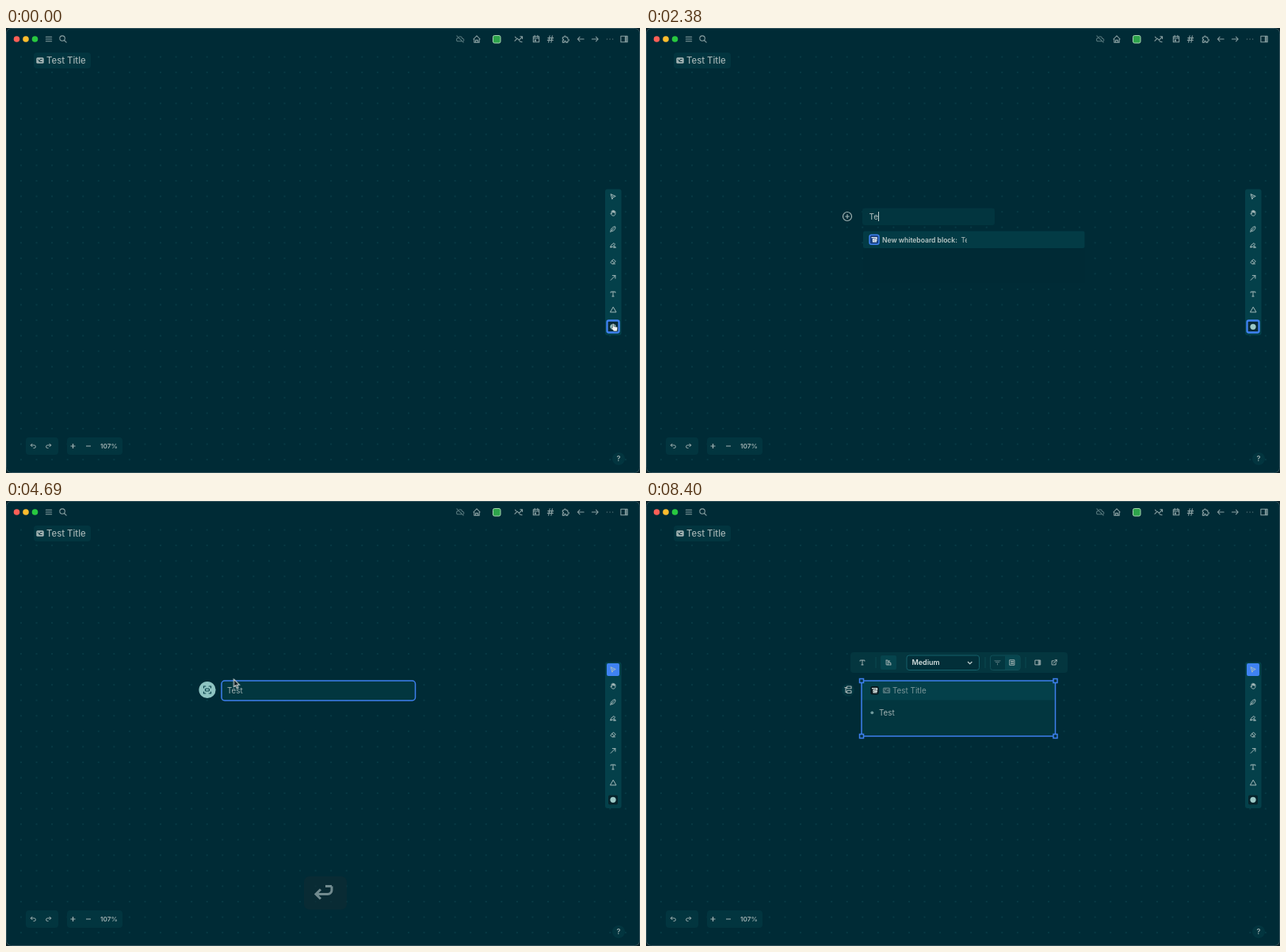
Animation, 800 px wide and 562 px high, one loop 8.47 s. Source, as an HTML page:

```html
<!DOCTYPE html>
<html lang="en">
<head>
<meta charset="utf-8">
<title>Whiteboard block</title>
<style>
html, body { margin: 0; width: 100%; height: 100%; overflow: hidden; background: #0b222a; }
body { position: relative; font-family: Inter, "Open Sans", sans-serif; color: #a3b3b3; }
svg { position: absolute; left: 0; top: 0; }
text { font-family: inherit; fill: currentColor; }

/* icons: 24-unit paths centred on their anchor */
.k, .t { fill: none; stroke: currentColor; stroke-width: 2.3; stroke-linecap: round; stroke-linejoin: round; }
.k { transform: scale(.46) translate(-12px, -12px); }
.t { transform: scale(.36) translate(-12px, -12px); stroke-width: 2.7; }
.dim { color: #55777c; }
.line { fill: none; stroke: currentColor; stroke-width: 1.2; }
.pill { fill: #02353f; }
.blue { stroke: #3e80ee; stroke-width: 1.5; }

.field, .row { position: absolute; display: flex; align-items: center; height: 22px; white-space: pre; }
.field { left: 281.5px; top: 227px; font-size: 9.8px; font-weight: 500; }
.row { left: 298px; font-size: 8.55px; font-weight: 500; }
.row b { font-weight: 600; color: #b9c6c5; }
.row i { font-style: normal; }
.row.sub { padding-left: 11px; color: #55777c; font-weight: 400; }
mark { margin-left: -1px; padding: 1px; border-radius: 1px; background: #f6eb9f; color: #68724f; }
.bar { width: 1px; height: 12px; background: #c3d0cf; }

/* timeline */
.a { animation: 8.47s step-end infinite; }
.menu { animation-name: menu; }
.hint { animation-name: hint; }
.typed { animation-name: typed; overflow: hidden; }
.after { animation-name: after; }
.found { animation-name: found; }
.caret { animation-name: caret; }
.edit { animation-name: edit; }
.caret2 { animation-name: caret2; }
.portal { animation-name: portal; }
.guide { animation-name: guide; }
.adding { animation-name: adding; }
.picking { animation-name: picking; }
.hand { animation-name: hand; }
.arrow { animation-name: arrow; }
.ring { animation-name: ring; animation-timing-function: ease-out; }
.ring2 { animation-name: ring2; animation-timing-function: ease-out; }
.key { animation-name: key; animation-timing-function: linear; }
.move { animation-name: move; animation-timing-function: ease-in-out; }

@keyframes menu { 0% { opacity: 0 } 11.57% { opacity: 1 } 49.59% { opacity: 0 } }
@keyframes hint { 0% { opacity: 1 } 23.97% { opacity: 0 } }
@keyframes after { 0% { opacity: 0 } 23.97% { opacity: 1 } }
@keyframes typed {
  0% { max-width: 0 } 23.97% { max-width: .6em } 26.45% { max-width: 1.13em }
  28.93% { max-width: 1.68em } 30.58% { max-width: 4em }
}
@keyframes found { 0% { opacity: 0 } 30.58% { opacity: 1 } 49.59% { opacity: 0 } }
@keyframes caret { 0% { opacity: 1 } 17.4% { opacity: 0 } 23.97% { opacity: 1 } 38.8% { opacity: 0 } 44.6% { opacity: 1 } }
@keyframes edit { 0% { opacity: 0 } 49.59% { opacity: 1 } 68.6% { opacity: 0 } }
@keyframes caret2 { 0% { opacity: 1 } 53.7% { opacity: 0 } 59.5% { opacity: 1 } 65.3% { opacity: 0 } }
@keyframes portal { 0% { opacity: 0 } 68.6% { opacity: 1 } }
@keyframes guide { 0% { opacity: 1 } 85% { opacity: 0 } }
@keyframes adding { 0% { opacity: 1 } 49.59% { opacity: 0 } }
@keyframes picking { 0% { opacity: 0 } 49.59% { opacity: 1 } }
@keyframes hand { 0% { opacity: 1 } 3.3% { opacity: 0 } }
@keyframes arrow { 0% { opacity: 0 } 3.3% { opacity: 1 } 21.5% { opacity: 0 } 52.07% { opacity: 1 } 88.5% { opacity: 0 } }
@keyframes ring {
  0%, 11.56% { opacity: 0; r: 6px } 11.57% { opacity: 1; r: 7px }
  13.3% { opacity: .75; r: 9.5px } 15.3%, 100% { opacity: 0; r: 11px }
}
@keyframes ring2 {
  0%, 68.5% { opacity: 0; r: 6px } 68.6% { opacity: 1; r: 7px }
  70.3% { opacity: .75; r: 9.5px } 72.3%, 100% { opacity: 0; r: 11px }
}
@keyframes key { 0%, 49.58% { opacity: 0 } 49.59%, 53.5% { opacity: 1 } 58.5%, 100% { opacity: 0 } }
@keyframes move {
  0%, 2.48% { transform: translate(766px, 374px) }
  10.74%, 52.07% { transform: translate(272px, 226px) }
  55.37%, 57.85% { transform: translate(287.5px, 225px) }
  67.3%, 100% { transform: translate(165.5px, 267px) }
}
</style>
</head>
<body>
<svg width="800" height="562" viewBox="0 0 800 562">
  <defs>
    <pattern id="dots" x="9.2" y="7.2" width="19.56" height="19.56" patternUnits="userSpaceOnUse">
      <circle cx="9.78" cy="9.78" r=".75" fill="#11505a"/>
    </pattern>
    <g id="menu"><path class="k" d="M4 6h16M4 12h16M4 18h16"/></g>
    <g id="search"><path class="k" d="M17 10a7 7 0 1 1-14 0a7 7 0 1 1 14 0M21 21l-6-6"/></g>
    <g id="cloud"><path class="k" d="M9.6 5.6a6 6 0 0 1 8.4 5.4h1a3.5 3.5 0 0 1 2.2 6.2M18 18H6.7a4.4 4.4 0 0 1 .2-9M3 3l18 18"/></g>
    <g id="home"><path class="k" d="M5 12H3l9-9 9 9h-2M5 12v9h14v-9M9 21v-6h6v6"/></g>
    <g id="trend"><path class="k" d="M1 17l7-7 5 5 9-10M16 5h6v6M2 6l3 3M14 18l7 2"/></g>
    <g id="calendar"><path class="k" d="M4 5h16v15H4zM4 10h16M8 2v5M16 2v5M8 14h3v3H8z"/></g>
    <g id="hash"><path class="k" d="M5 9h15M4 15h15M10 3L7 21M17 3l-3 18"/></g>
    <g id="puzzle"><path class="k" d="M4 7h4V6a2 2 0 0 1 5 0v1h5v5h1a2 2 0 0 1 0 5h-1v4h-5v-2a2 2 0 0 0-4 0v2H4v-5h1a2 2 0 0 0 0-4H4z"/></g>
    <g id="back"><path class="k" d="M4 12h17M10 6l-6 6 6 6"/></g>
    <g id="next"><path class="k" d="M3 12h17M14 6l6 6-6 6"/></g>
    <g id="more"><path class="k" stroke-width="4" d="M4 12h.1M12 12h.1M20 12h.1"/></g>
    <g id="side"><path class="k" d="M3 4h18v16H3zM15 4v16M18 5v14"/></g>

    <g id="select"><path class="t" d="M4 4l5 17 3-7 8-3zM9 9l3 3"/></g>
    <g id="palm"><path class="t" d="M7 14V6a1.7 1.7 0 0 1 3 0v5V4a1.7 1.7 0 0 1 3.300 0v7V5a1.700 1.700 0 0 1 3.300 0v7V8a1.700 1.700 0 0 1 3.400 0v7c0 4-3 7-7 7s-6-2-9-7c-1-2 1-3 3-1z"/></g>
    <g id="pencil"><path class="t" d="M3 21l2-8C7 8 13 3 19 3c3 4 0 11-5 14l-8 3zM8 16l6-7"/></g>
    <g id="marker"><path class="t" d="M3 18l3-7 9-7 4 4-8 8zM3 18h6M14 19l3-5 4 5z"/></g>
    <g id="eraser"><path class="t" d="M19 20H8l-5-5L13 4l8 7-9 9M8 9l8 7"/></g>
    <g id="ne"><path class="t" d="M4 20L20 4M10 4h10v10"/></g>
    <g id="type"><path class="t" d="M4 7V4h16v3M12 4v16M9 20h6"/></g>
    <g id="tri"><path class="t" d="M12 3L2 20h20z"/></g>
    <g id="undo"><path class="t" d="M8 4L3 9l5 5M3 9h12a5 5 0 0 1 0 10h-2"/></g>
    <g id="redo"><path class="t" d="M16 4l5 5-5 5M21 9H9a5 5 0 0 0 0 10h2"/></g>
    <g id="scale"><path class="t" d="M4 4v16h16M4 4h6v16M10 11l5-6v8M15 13h5v7"/></g>
    <g id="pane"><path class="t" d="M3 4h18v16H3zM14 4v16M18 5v14"/></g>
    <g id="open"><path class="t" d="M12 6H4v14h14v-8M10 14L21 3M15 3h6v6"/></g>
    <g id="page"><path class="t" d="M4 3h16v18H4zM8 8h8M8 12h8M8 16h8"/></g>
    <g id="fold"><path class="t" d="M2 6h20M6 11h12M12 15v5"/></g>

    <g id="board">
      <rect x="-4.700" y="-3.800" width="9.400" height="7.600" rx="1.600" fill="currentColor"/>
      <path d="M-2.800-1.500l2 3 1-3h2.500M-.5 1.500h3" fill="none" stroke="#06313b" stroke-width=".9"/>
    </g>
    <g id="chip"><rect x="-5.200" y="-5.200" width="10.400" height="10.400" rx="2.200" fill="#07191f"/></g>
    <g id="lines"><path class="line" d="M-3.500-2.700H3V-.6H-1.500V2.600H3M-.5 1H3.500"/></g>
    <g id="block"><use href="#chip"/><use href="#lines" color="#dfe8e6"/></g>
    <g id="bfind"><use href="#chip"/><g class="line" color="#dfe8e6"><path d="M-3.500-2.700H3M-1.500-2.500V.5H0M2.300 2.300l1.500 1.500"/><circle cx="1.300" cy="1" r="1.700"/></g></g>
    <g id="pfind"><use href="#chip"/><g class="line" color="#dfe8e6"><path d="M-.5 3.500H-3v-7h6V-.5M2.300 2.700l1.500 1.300"/><circle cx="1.300" cy="1.400" r="1.600"/></g></g>
    <g id="bchip"><use href="#chip"/><use href="#board" color="#dfe8e6"/></g>
    <g id="pchip"><use href="#chip"/><path d="M-2.700 3.500v-6.500h5.400v6.500M-2.700-2h5.400" fill="none" stroke="#dfe8e6" stroke-width="1.500"/></g>
    <g id="active"><rect x="-6" y="-6" width="12" height="12" rx="2.500" fill="#173f80" class="blue" stroke-width="1.300"/><use href="#lines" color="#f0f4f4"/></g>
  </defs>

  <rect x=".5" y=".5" width="799" height="561" rx="6" fill="#002b36" stroke="#31515a"/>
  <rect x="1" y="28" width="798" height="531" fill="url(#dots)"/>

  <g>
    <circle cx="13.500" cy="14" r="3.800" fill="#ff5f57"/>
    <circle cx="25" cy="14" r="3.800" fill="#febc2e"/>
    <circle cx="36.500" cy="14" r="3.800" fill="#28c840"/>
  </g>
  <g color="#8ca2a4">
    <use href="#menu" x="54" y="14"/>
    <use href="#search" x="72" y="14"/>
    <use href="#cloud" x="573" y="14" class="dim"/>
    <use href="#home" x="594" y="14"/>
    <rect x="614.500" y="9.500" width="9.500" height="9.500" rx="2" fill="#2ea44b" stroke="#a5d3b0"/>
    <use href="#trend" x="647" y="14"/>
    <use href="#calendar" x="669" y="14"/>
    <use href="#hash" x="687" y="14"/>
    <use href="#puzzle" x="706" y="14"/>
    <use href="#back" x="725" y="14"/>
    <use href="#next" x="743.500" y="14"/>
    <use href="#more" x="762" y="14"/>
    <use href="#side" x="780" y="14"/>
  </g>

  <rect class="pill" x="35" y="31" width="72" height="20" rx="4"/>
  <use href="#board" x="43" y="41"/>
  <text x="51" y="45" font-size="11.300" font-weight="500">Test Title</text>

  <rect class="pill" x="25" y="517" width="41" height="22" rx="4"/>
  <rect class="pill" x="77" y="517" width="70" height="22" rx="4"/>
  <use href="#undo" x="34.500" y="528"/>
  <use href="#redo" x="53.500" y="528"/>
  <path class="line" d="M81.500 528h6M84.500 525v6M101 528h6"/>
  <text x="119" y="531" font-size="8.200" font-weight="600">107%</text>
  <circle class="pill" cx="773" cy="544" r="8"/>
  <text x="773" y="547.300" font-size="9" font-weight="600" text-anchor="middle">?</text>

  <rect x="756" y="203.500" width="20.500" height="184.500" rx="3" fill="#04404a"/>
  <g class="a picking"><rect x="758" y="205" width="16" height="16" rx="2" fill="#3f82f2"/></g>
  <g color="#a9bcbc">
    <use href="#select" x="766" y="213"/>
    <use href="#palm" x="766" y="233.500"/>
    <use href="#pencil" x="766" y="254"/>
    <use href="#marker" x="766" y="274.500"/>
    <use href="#eraser" x="766" y="295"/>
    <use href="#ne" x="766" y="315.500"/>
    <use href="#type" x="766" y="336"/>
    <use href="#tri" x="766" y="356"/>
  </g>
  <rect x="760" y="371.500" width="12" height="12" rx="2" fill="#06232b"/>
  <g class="a adding"><rect x="758.500" y="369.500" width="15" height="15" rx="2" fill="#082a36" stroke="#3f82f2" stroke-width="2.300"/></g>
  <circle cx="766" cy="377.300" r="3.600" fill="#9cc8c6"/>
</svg>

<div class="a menu">
  <svg width="800" height="562">
    <circle class="line" cx="254" cy="238" r="5.500"/>
    <path class="line" d="M251.300 238h5.400M254 235.300v5.400"/>
    <rect class="pill" x="273" y="227.500" width="167" height="21.500" rx="3"/>
    <rect x="274" y="257" width="280" height="65" fill="#002a35"/>
    <rect x="274" y="256.500" width="279.500" height="21.500" rx="2" fill="#033b45"/>
    <use href="#active" x="288" y="267.300"/>
    <g class="a hint">
      <text x="281.500" y="241.500" font-size="9.700" font-weight="500">Create or search your graph...</text>
      <use href="#bfind" x="288" y="289.500"/>
      <use href="#pfind" x="288" y="311.500"/>
    </g>
  </svg>
  <div class="field"><span class="a typed">Test</span><span class="bar a caret"></span></div>
  <div class="row" style="top:256.500px"><b>New whiteboard block<i class="a after">: </i></b><span class="a typed"> Test</span></div>
  <div class="a hint">
    <div class="row" style="top:278.500px">Search only blocks</div>
    <div class="row" style="top:300.500px">Search only pages</div>
  </div>
</div>

<div class="a found">
  <svg width="800" height="562">
    <rect x="274" y="279" width="275" height="162" fill="#002a35"/>
    <path d="M274 440.500h279" stroke="#02222b"/>
    <rect x="549" y="256.500" width="4" height="88.500" rx="1" fill="#1a565e"/>
    <use href="#bchip" x="288" y="289.500"/>
    <use href="#pchip" x="288" y="311.500"/>
    <use href="#bchip" x="288" y="333.500"/>
    <use href="#pchip" x="288" y="355.500"/>
    <use href="#block" x="288" y="377.500"/>
    <use href="#block" x="288" y="416"/>
    <g color="#31585f"><use href="#board" x="302.500" y="377.500"/><use href="#board" x="302.500" y="416"/></g>
  </svg>
  <div class="row" style="top:278.500px"><mark>test</mark></div>
  <div class="row" style="top:300.500px"><mark>test</mark>-123</div>
  <div class="row" style="top:322.500px"><mark>Test</mark> Title</div>
  <div class="row" style="top:344.500px"><mark>test</mark>ing the <mark style="margin-left:0">test</mark></div>
  <div class="row sub" style="top:366.500px">Test Title</div>
  <div class="row" style="top:383px"><mark>test</mark></div>
  <div class="row sub" style="top:405px">Test Title</div>
  <div class="row" style="top:421.500px"><mark>test</mark></div>
</div>

<svg width="800" height="562">
  <g class="a edit">
    <circle cx="254" cy="238.500" r="10.600" fill="#8fc4c2"/>
    <g fill="none" stroke="#0a434c" stroke-width="1.200" stroke-linecap="round">
      <path d="M249.500 236v-2h2.300M256.200 234h2.300v2M258.500 241v2h-2.300M251.800 243h-2.300v-2"/>
      <rect x="251.500" y="237" width="5" height="3" rx="1"/>
    </g>
    <rect x="272" y="227" width="244.500" height="25" rx="4" fill="#02363f" class="blue"/>
    <text x="279" y="242.600" font-size="9.800">Test</text>
    <rect class="a caret2" x="299.500" y="233" width="1" height="12" fill="#c3d0cf"/>
  </g>

  <g class="a portal">
    <rect x="258" y="191" width="274" height="26" rx="4" fill="#04363f"/>
    <path d="M290 197v14M428 197v14M479 197v14" stroke="#0b4851"/>
    <rect x="296" y="195" width="20" height="18" rx="2" fill="#06444d"/>
    <rect x="329" y="195" width="91.500" height="18.500" rx="3" fill="#022f39" stroke="#14606a"/>
    <rect x="434.500" y="195" width="37.500" height="18.500" rx="3" fill="#033740" stroke="#115059"/>
    <rect x="453" y="195.500" width="18.500" height="17.500" fill="#07464f"/>
    <use href="#type" x="273" y="204"/>
    <use href="#scale" x="306" y="204"/>
    <text x="335.500" y="207.300" font-size="9" font-weight="600" fill="#d5dfde" style="fill:#d5dfde">Medium</text>
    <path class="line" d="M406 203l2.700 2.700 2.700-2.700" style="color:#c5d2d1"/>
    <use href="#fold" x="443.500" y="204" class="dim"/>
    <use href="#page" x="462" y="204"/>
    <use href="#pane" x="494.500" y="204"/>
    <use href="#open" x="515" y="204"/>

    <circle class="pill" cx="255" cy="239" r="8"/>
    <g class="line"><path d="M250.500 235.500h3M252 236v5.500h1.500"/><rect x="253.500" y="234" width="5.500" height="3" rx=".6"/><rect x="253.500" y="239.500" width="5.500" height="3" rx=".6"/></g>

    <rect x="272" y="227" width="244.500" height="70" fill="#02363f"/>
    <rect x="272" y="227" width="244.500" height="24.500" fill="#04404a"/>
    <use href="#block" x="288.500" y="239.300"/>
    <use href="#board" x="303.500" y="239.300" color="#4c7379"/>
    <text x="311" y="242.800" font-size="9.900" style="fill:#7c979a">Test Title</text>
    <circle cx="285.300" cy="267.300" r="1.900" fill="#6e999b"/>
    <text x="294" y="270.800" font-size="9.800">Test</text>
    <path class="a guide" d="M283.500 273v19" stroke="#0b4a53"/>
    <rect x="272" y="227" width="244.500" height="70" fill="none" class="blue"/>
    <path class="blue" fill="#04323e" d="M269.500 224.500h5v5h-5zM514 224.500h5v5h-5zM269.500 294.500h5v5h-5zM514 294.500h5v5h-5z"/>
  </g>

  <g class="a key">
    <rect x="376" y="474" width="54" height="42" rx="7" fill="#102b33"/>
    <path d="M411 486.500v5a5 5 0 0 1-5 5h-14M397 490.500l-6 6 6 6M403 486.500h8" fill="none" stroke="#b6c4c5" stroke-width="3"/>
  </g>

  <circle class="a ring" cx="272" cy="227" fill="none" stroke="#145664" stroke-width="1.500"/>
  <circle class="a ring2" cx="166" cy="268" fill="none" stroke="#145664" stroke-width="1.500"/>
  <g class="a move">
    <path class="a arrow" d="M0 0v9.800l2.300-2 1.600 3.600 1.700-.8-1.600-3.400h3z" fill="#0c171b" stroke="#d5dddd" stroke-width="1.100"/>
    <path class="a hand" d="M-.8 4.500V.3a1 1 0 0 1 2 0v2.500l3.800.7q1 .3.800 1.500l-.7 4H1L-2 5.500q0-1.200 1.200-1z" fill="#eef3f3" stroke="#19323a" stroke-width=".7"/>
  </g>
</svg>
</body>
</html>
```
